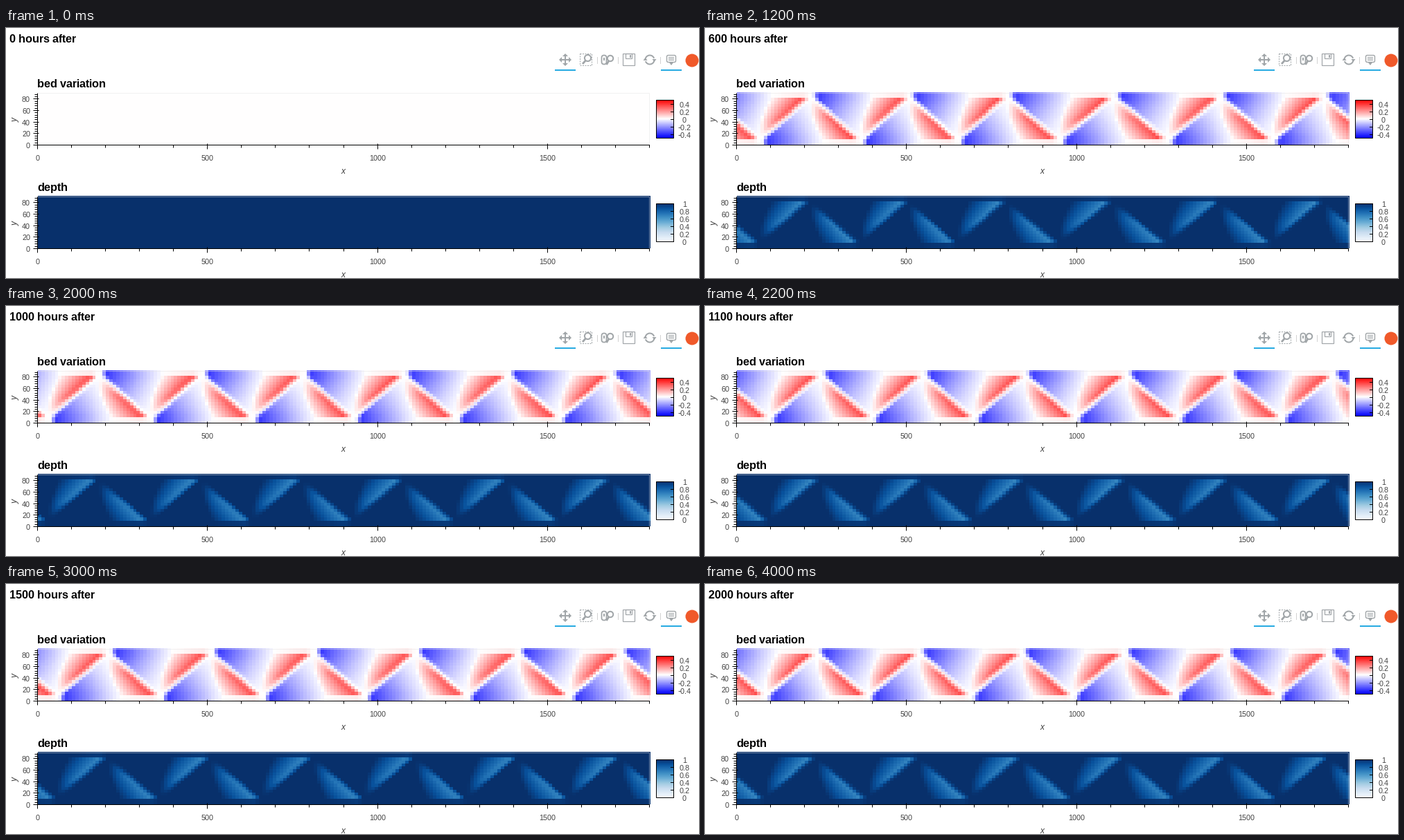
Animation, 1000 px wide and 362 px high, one loop 4200 ms. Source, as a matplotlib script:

```python
import numpy as np
import matplotlib.pyplot as plt
from matplotlib.animation import FuncAnimation
from matplotlib.colors import LinearSegmentedColormap
from matplotlib.patches import Arc, Circle, FancyBboxPatch, Polygon, Rectangle

W, H, DPI = 1000, 362, 100
PX = 72 / DPI                      # points per pixel
LEFT, RIGHT = 45.5, 928.5          # plot sides
COLS, ROWS = 180, 18
WAVE, LEAN, SPEED = 147.7, 70, 32.2
GREY, TEXT, BLUE = "#a1a6a9", "#444444", "#26aae1"
BWR = LinearSegmentedColormap.from_list("bwr2", ["#0000ff", "#ffffff", "#ff0000"])

plt.rcParams.update({
    "font.family": "Liberation Sans",
    "text.hinting": "native",
    "text.hinting_factor": 1,
    "path.snap": False,            # strokes are placed on pixel centres by hand
})
fig = plt.figure(figsize=(W / DPI, H / DPI), dpi=DPI, facecolor="white")
ax = fig.add_axes([0, 0, 1, 1])


def line(xs, ys, color="black", w=1, z=4, alpha=1):
    ax.plot(xs, ys, color=color, lw=w * PX, zorder=z, alpha=alpha,
            solid_capstyle="butt", solid_joinstyle="miter")


def label(x, y, s, size=11, color=TEXT, **kw):
    return ax.text(x, y, s, fontsize=size * PX, color=color, zorder=6, **kw)


def shape(patch):
    patch.set_zorder(5)
    ax.add_patch(patch)


def crisp(v):
    return np.floor(v) + 0.5


# ---- bed model: alternate bars drifting downstream ----

def smooth(t):
    t = np.clip(t, 0, 1)
    return t * t * (3 - 2 * t)


def bars(d, v, edge):
    """Scour then deposit behind each front; d is distance from the bar tip."""
    gap = WAVE / 2 - LEAN + 2 * LEAN * v
    e = (d + WAVE / 2 + LEAN * v) % WAVE
    s = e / gap
    scour = -0.42 * v ** 1.5 * np.clip(1 - s / 0.62, 0, 1) ** 1.1
    scour = scour * np.clip(e / 8, 0, 1)
    start = 0.4 + 0.2 * v
    crest = 0.34 * smooth((v + 0.05) / 0.6)
    crest = crest * np.clip((s - start) / (0.92 - start), 0, 1)
    crest = crest * np.clip((gap - e) / 11, 0, 1) * np.where(edge, 0.12, 1)
    return np.where(e < gap, scour + crest, 0)


def bed(n):
    if n < 2:
        return np.zeros((ROWS, COLS))
    x = LEFT + (np.arange(COLS) + 0.5) * (RIGHT - LEFT) / COLS
    y = ((np.arange(ROWS) + 0.5) * 90 / ROWS)[:, None]
    late = max(n - 4, 0)
    centre = 385 + SPEED * (n - 4)
    warp = -15 * np.exp(-((x - centre) / 190) ** 2 - (late / 5) ** 2)
    d = (x - warp - 160 - SPEED * (n - 20))[None, :]
    v = np.clip((y - 10) / 70, 0, 1)
    z = bars(d, v, y > 80) + bars(d - WAVE / 2, 1 - v, y < 10)
    growth = 1.02 / (1 + np.exp(-2 * (n - 2.9 + 0.4 * (x - 450) / 450)))
    return z * growth


# ---- plots ----

def plot(top, title, cmap, lo, hi):
    bottom = top + 75

    def sx(v):
        return crisp(LEFT + v * (RIGHT - LEFT) / 1800)

    def sy(v):
        return crisp(bottom - v * 75 / 90)

    label(45, top - 8.5, title, 16, "black", weight="bold")
    im = ax.imshow(np.zeros((ROWS, COLS)), cmap=cmap, vmin=lo, vmax=hi,
                   extent=(LEFT, RIGHT + 0.5, bottom, top - 0.5),
                   origin="lower", interpolation="nearest", aspect="auto",
                   zorder=1)
    line([LEFT, RIGHT, RIGHT], [top, top, bottom], "#e5e5e5", z=2, alpha=0.5)
    line([LEFT, LEFT], [top, bottom + 0.5])
    line([LEFT, RIGHT + 0.5], [bottom, bottom])
    for v in range(0, 1801, 100):
        major = v % 500 == 0
        line([sx(v)] * 2, [bottom - 2 * major, bottom + (6 if major else 4)])
        if major:
            label(sx(v), bottom + 22.5, str(v), ha="center")
    for v in range(0, 89, 4):
        major = v % 20 == 0
        line([LEFT - (6 if major else 4), LEFT + 2 * major], [sy(v)] * 2)
        if major:
            label(35, sy(v) + 4.5, str(v), ha="right")
    label(487, bottom + 41.5, "x", 13, style="italic", ha="center")
    label(13, bottom - 37, "y", 13, style="italic", rotation=90,
          ha="center", va="center")
    return im


def colorbar(top, cmap, ticks, lo, hi):
    bottom = top + 55
    ax.imshow(np.linspace(0, 1, 256)[:, None], cmap=cmap, vmin=0, vmax=1,
              extent=(938.5, 963.5, bottom, top), origin="lower",
              aspect="auto", zorder=1)
    shape(Rectangle((938.5, top), 25, 55, fill=False, ec="black", lw=PX))
    for t in ticks:
        y = crisp(bottom - 55 * (t - lo) / (hi - lo))
        line([959, 964], [y, y])
        label(979, y + 4.5, f"{t:g}", ha="center")


# ---- toolbar ----

def lens(x, y, r, tx, ty):
    shape(Circle((x, y), r, fill=False, ec=GREY, lw=2 * PX))
    k = r / np.hypot(tx - x, ty - y)
    line([x + (tx - x) * k, tx], [y + (ty - y) * k, ty], GREY, 2.8)


def box(x, y, w, h, **kw):
    shape(Rectangle((x, y), w, h, fill=False, ec=GREY, **kw))


def rounded(x, y, w, h, r, lw):
    shape(FancyBboxPatch((x, y), w, h, fill=False, ec=GREY, lw=lw * PX,
                         boxstyle=f"round,pad=0,rounding_size={r}"))


def toolbar():
    # pan
    cx, cy = 807, 46
    line([cx - 7, cx + 7], [cy, cy], GREY, 2)
    line([cx, cx], [cy - 7, cy + 7], GREY, 2)
    for dx, dy in ((1, 0), (-1, 0), (0, 1), (0, -1)):
        bx, by = cx + 5 * dx, cy + 5 * dy
        shape(Polygon([(cx + 9 * dx, cy + 9 * dy),
                       (bx + 4 * dy, by + 4 * dx),
                       (bx - 4 * dy, by - 4 * dx)], color=GREY, lw=0))
    # box zoom
    box(828.5, 37.5, 17, 17, lw=PX, ls=(0, (2, 1.5)))
    lens(839.5, 43.5, 4.6, 832, 52)
    # wheel zoom
    rounded(859.5, 39.5, 7, 13, 3.4, 1.8)
    line([863, 863], [43, 47], GREY, 2)
    lens(872, 44, 4.2, 866.5, 53)
    # save
    box(890.5, 37.5, 17, 17, lw=1.2 * PX)
    box(894.5, 37.5, 9, 7, lw=1.2 * PX)
    line([901, 901], [39, 43], GREY, 2)
    # reset
    for a, ty, s in ((185, 46, 1), (5, 46, -1)):
        shape(Arc((929, 46), 13, 13, theta1=a, theta2=a + 155,
                  ec=GREY, lw=2 * PX))
        tx = 929 + 6.5 * s
        shape(Polygon([(tx - 3, ty - s), (tx + 3, ty - s), (tx, ty + 3 * s)],
                      color=GREY, lw=0))
    # hover
    rounded(953.5, 39.5, 13, 10, 2, 1.4)
    shape(Polygon([(957, 50), (963, 50), (960, 54)], color=GREY, lw=0))
    for y in (42.5, 44.5, 46.5):
        line([956, 964], [y, y], GREY)

    for x in (853.5, 883.5, 944.5):
        line([x, x], [42, 52], "#d3d3d3")
    for x in (792, 945):
        line([x, x + 30], [61, 61], BLUE, 2)
    shape(Circle((990, 47), 9.5, color="#f0592a", lw=0))


heading = label(5, 21, "", 16, "black", weight="bold")
bed_im = plot(94.5, "bed variation", BWR, -0.5, 0.5)
depth_im = plot(244.5, "depth", "Blues", 0, 1)
colorbar(104.5, BWR, (0.4, 0.2, 0, -0.2, -0.4), -0.5, 0.5)
colorbar(254.5, "Blues", (1, 0.8, 0.6, 0.4, 0.2, 0), 0, 1)
toolbar()
ax.set_xlim(0, W)
ax.set_ylim(H, 0)
ax.axis("off")


def draw(n):
    z = bed(n)
    heading.set_text(f"{100 * n} hours after")
    bed_im.set_data(z)
    depth_im.set_data(1 - 0.95 * np.maximum(z, 0))
    return heading, bed_im, depth_im


anim = FuncAnimation(fig, draw, frames=21, interval=200, repeat=True)
plt.show()
```
